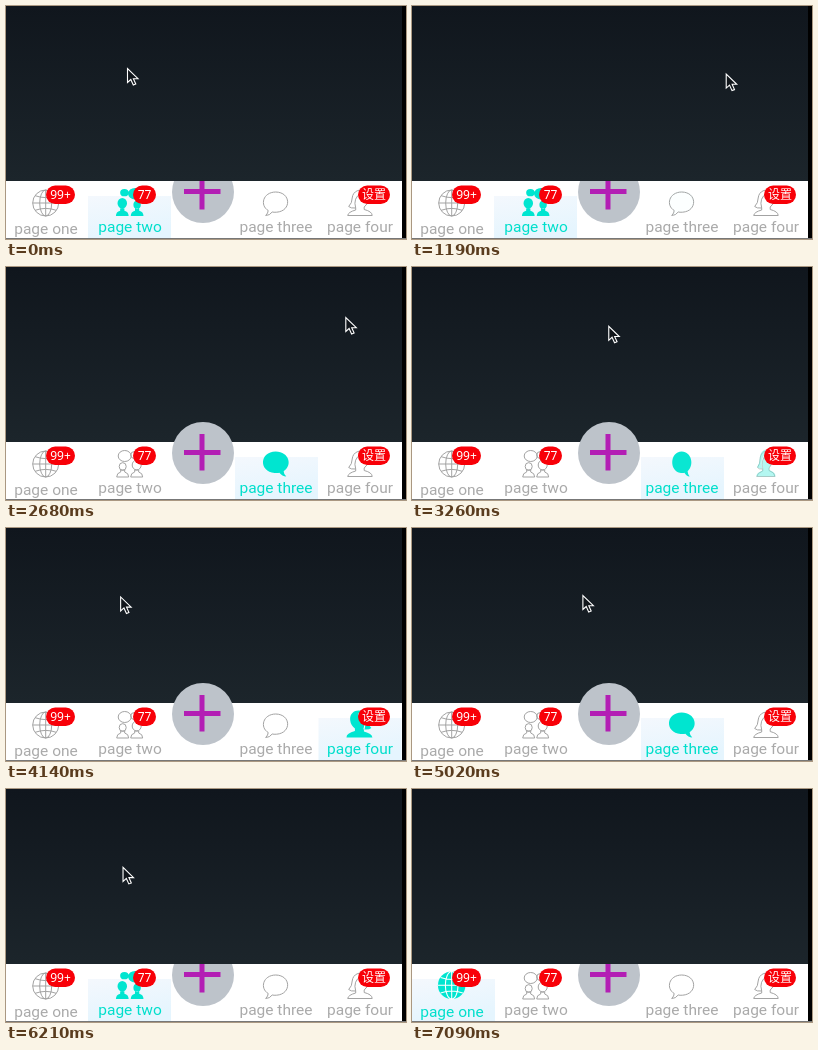
Write an HTML page that moves like this. It is 400x233 px and loops after 7390 ms.

```html
<!DOCTYPE html>
<html lang="en">
<head>
<meta charset="utf-8">
<title>Tab bar</title>
<style>
  html, body { margin: 0; width: 100%; height: 100%; overflow: hidden; background: #000; }
  svg { display: block; width: 100%; height: 100%; }
  text { text-anchor: middle; }
  .label { font: 15.5px Roboto, sans-serif; fill: #aaa; }
  .label.on { fill: #00dfcc; }
  .badge { font: 12px "Noto Sans", "Noto Sans CJK SC", "Noto Sans CJK", sans-serif; fill: #fff; }
  .line path { fill: none; stroke: #a3a3a3; }
  .solid .outer { fill: #00e5d0; }
  .solid .inner { fill: none; stroke: #fff; }
</style>
</head>
<body>
<svg viewBox="0 0 400 233">
  <defs>
    <linearGradient id="night" x2="0" y2="1">
      <stop stop-color="#10161d"/><stop offset="1" stop-color="#1c252b"/>
    </linearGradient>
    <linearGradient id="glow" x2=".3" y2="1">
      <stop stop-color="#f4f8fd"/><stop offset="1" stop-color="#e5f5fe"/>
    </linearGradient>
    <clipPath id="bar"><path d="M0 175H396V233H0z"/></clipPath>
  </defs>
  <path d="M0 0H396V175H0z" fill="url(#night)"/>
  <path d="M0 175H396V232H0z" fill="#fff"/>
  <path d="M0 232H400V233H0z" fill="#777"/>
  <rect id="light" y="190" width="83" height="42" fill="url(#glow)"/>
  <g id="tabs"></g>
  <g id="plus">
    <circle cx="197" cy="186" r="31" fill="#bdc3ca"/>
    <path d="M178 185.5H214.5M196 167V203.5" stroke="#b31eb4" stroke-width="5"/>
  </g>
  <path id="cursor" d="M.5 .5V14.5L3.8 11.5L6.3 17L8.8 16L6.4 10.7H11z" fill="#11161b" stroke="#fff" stroke-width="1.1"/>
</svg>
<script>
const LOOP = 7390, STEP = 147.8;
const $ = id => document.getElementById(id);
const ease = u => (1 - Math.cos(Math.PI * Math.min(1, Math.max(0, u)))) / 2;

const oval = (x, y, rx, ry = rx) =>
  `M${x - rx} ${y}a${rx} ${ry} 0 1 0 ${2 * rx} 0a${rx} ${ry} 0 1 0 ${-2 * rx} 0z`;
const person = (x, y, r) =>
  oval(x, y, r, r * 1.1) + `M${x - 6} 13q0-4 4-5v-2h4v2q4 1 4 5z`;

// Icons are drawn around their own centre, in the unselected orientation.
const tabs = [
  { x: 40, left: 0, name: 'page one', badge: ['99+', 40, 29],
    outer: oval(0, 0, 13),
    inner: oval(0, 0, 6, 13) + 'M0-13V13M-13 0H13M-10.5-7.3Q0-3.5 10.5-7.3M-10.5 7.3Q0 3.5 10.5 7.3' },
  { x: 124, left: 82, name: 'page two', badge: ['77', 127, 23],
    outer: oval(-5, -8, 6.5, 5.5) + oval(5, -9, 4, 3.5) + person(-7, 2.5, 3.5) + person(7, 1, 4.5),
    inner: '' },
  { x: 270, left: 229, name: 'page three', badge: null,
    outer: 'M-7.5 7.5C-16 2.5-13-10.8 0-11C15.5-10.8 16 8 1 9.2Q-2 9.4-3.5 9Q-6 12.5-10 12.5Q-7.5 10-7.5 7.5z',
    inner: '' },
  { x: 354, left: 312.5, name: 'page four', badge: ['设置', 352, 32],
    outer: 'M-12 12.5Q-11.5 9-4 7V5Q-9 5.5-11 3.5Q-7.5 0-7.5-5C-6.5-16 10-15.5 9-4Q8.5 1 4.5 4V6.5Q12.5 8.5 12.5 12.5z',
    inner: 'M-4 5Q-7-5 1.5-10' }
];

$('tabs').innerHTML = tabs.map((t, i) => {
  const layer = (kind, place) =>
    `<g class="${kind}" transform="${place}"><path class="outer" d="${t.outer}"/><path class="inner" d="${t.inner}"/></g>`;
  let s = `<text class="label" x="${t.x}" y="${i ? 226 : 227.5}">${t.name}</text>
    <g class="icon">${layer('line', '')}${layer('solid', 'translate(0 -.8) scale(1.06)')}</g>`;
  if (t.badge) {
    const [text, x, w] = t.badge;
    s += `<rect x="${x}" y="179.5" width="${w}" height="18.5" rx="9.2" fill="#f80008"/>
      <text class="badge" x="${x + w / 2}" y="193">${text}</text>`;
  }
  return `<g>${s}</g>`;
}).join('');

tabs.forEach((t, i) => {
  const g = $('tabs').children[i];
  for (const part of ['label', 'icon', 'line', 'solid']) t[part] = g.querySelector('.' + part);
});

// Turning points of the hand: [step, x, y]
const turns = [
  [0, 121, 62], [6, 332, 67], [7, 332, 67], [13, 59, 76], [18.7, 350, 49], [25.6, 20, 70],
  [32, 325, 65], [35.3, 92, 68], [39.5, 315, 72], [42.6, 97, 78.5], [45.5, 350, 71], [47, 340, 206]
];
// Page changes: [first step, last step, new page]
const swipes = [[7.5, 15.3, 2], [19.5, 27.3, 3], [28.3, 34, 2], [35.3, 41, 1], [42, 47, 0]];

function hand(k) {
  const i = turns.findIndex(t => t[0] >= k);
  if (i < 1) return turns.at(i).slice(1);
  const [k0, x0, y0] = turns[i - 1], [k1, x1, y1] = turns[i];
  const u = ease((k - k0) / (k1 - k0));
  return [x0 + (x1 - x0) * u, y0 + (y1 - y0) * u];
}

const pageAt = k => swipes.reduce((page, [a, b, to]) => page + (to - page) * ease((k - a) / (b - a)), 1);

function draw(time) {
  const k = Math.floor((time % LOOP + 10) / STEP); // the picture moves in even steps
  const [x, y] = hand(k), page = pageAt(k), picked = Math.round(page);

  tabs.forEach((t, i) => {
    const f = Math.max(0, 1 - Math.abs(page - i));
    const tint = Math.min(1, 1.25 * f);
    t.icon.setAttribute('transform', `translate(${t.x - .3} 197) scale(${Math.cos(Math.PI * f)} 1)`);
    t.line.setAttribute('opacity', 1 - tint);
    t.solid.setAttribute('opacity', tint);
    t.label.classList.toggle('on', i === picked);
  });
  $('light').setAttribute('x', tabs[picked].left);
  $('plus').setAttribute('clip-path', picked < 2 ? 'url(#bar)' : 'none');
  $('cursor').setAttribute('transform', `translate(${x} ${y})`);
  $('cursor').setAttribute('visibility', k < 48 ? 'visible' : 'hidden');
}

const start = performance.now();
(function tick() {
  draw(performance.now() - start);
  requestAnimationFrame(tick);
})();
</script>
</body>
</html>
```
